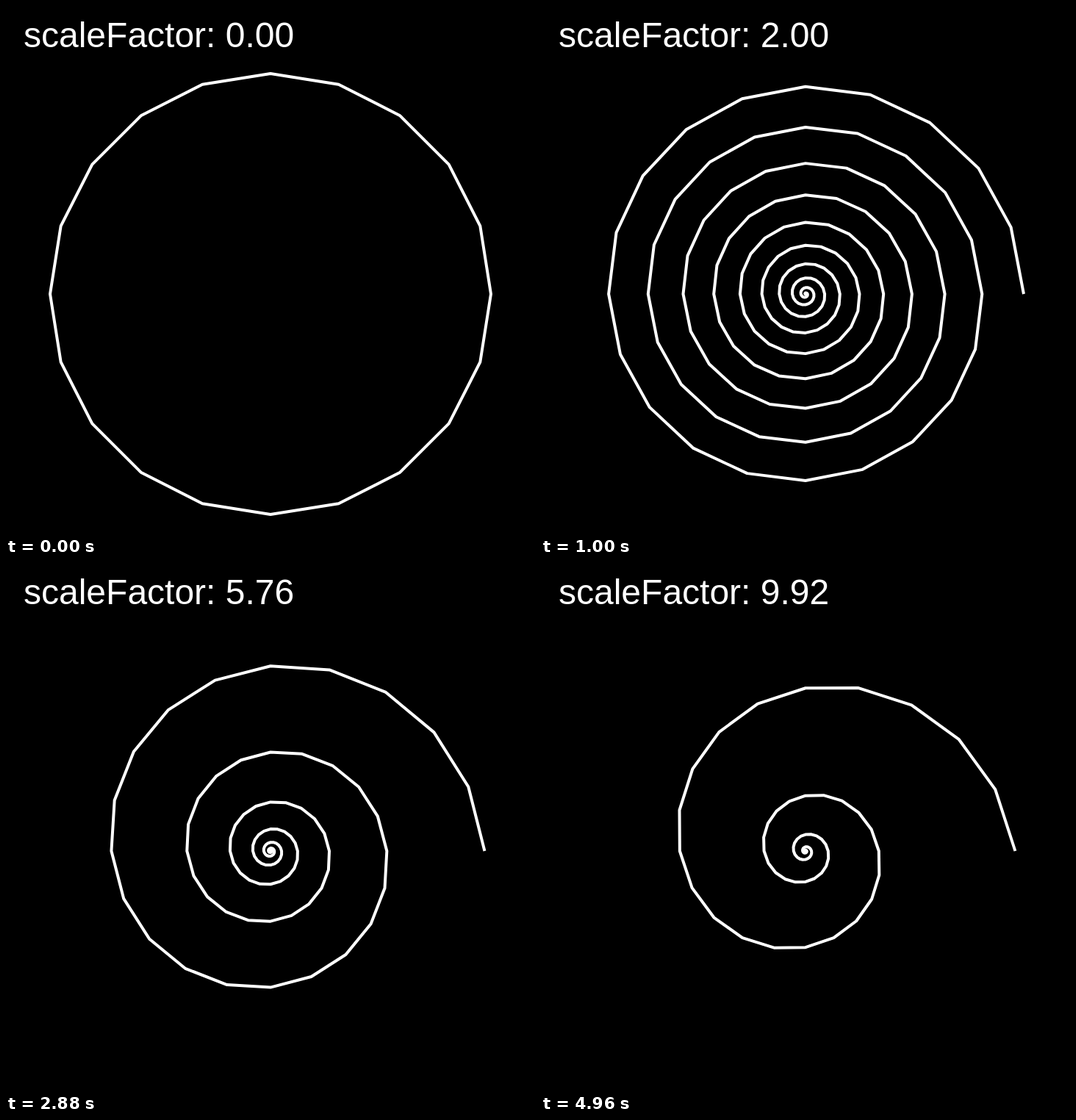
Write an HTML page that moves like this. It is 720x720 px and loops after 5 s.

```html
<!DOCTYPE html>
<html lang="en">
<head>
<meta charset="utf-8">
<title>Spiral scale factor</title>
<style>
  html, body { margin: 0; width: 100%; height: 100%; overflow: hidden; background: #000; }
  svg { display: block; width: 720px; height: 720px; }
  text { font: 48px Arial, "Liberation Sans", sans-serif; fill: #fff; }
  polyline { fill: none; stroke: #fff; stroke-width: 4; stroke-linejoin: round; }
</style>
</head>
<body>
<svg viewBox="0 0 720 720">
  <text id="label" x="24" y="56"></text>
  <polyline id="spiral"/>
</svg>
<script>
  const LOOP = 5000, STEP = 40, MAX_SCALE = 10;
  const CENTER_X = 360, CENTER_Y = 392, RADIUS = 300;
  const POINTS = 200, SIDES = 20;

  const label = document.getElementById("label");
  const spiral = document.getElementById("spiral");

  // The scale factor is the exponent of the radius along the spiral.
  function spiralPoint(i, scale) {
    const radius = RADIUS * (i / POINTS) ** scale;
    const angle = (i + 1) * 2 * Math.PI / SIDES;
    const x = CENTER_X + radius * Math.cos(angle);
    const y = CENTER_Y + radius * Math.sin(angle);
    return `${x.toFixed(2)},${y.toFixed(2)}`;
  }

  function draw(now) {
    const time = Math.floor(now % LOOP / STEP) * STEP;
    const scale = time / LOOP * MAX_SCALE;
    label.textContent = `scaleFactor: ${scale.toFixed(2)}`;
    const points = Array.from({ length: POINTS }, (_, i) => spiralPoint(i, scale));
    spiral.setAttribute("points", points.join(" "));
  }

  function tick() {
    draw(performance.now());
    requestAnimationFrame(tick);
  }
  tick();
</script>
</body>
</html>
```
